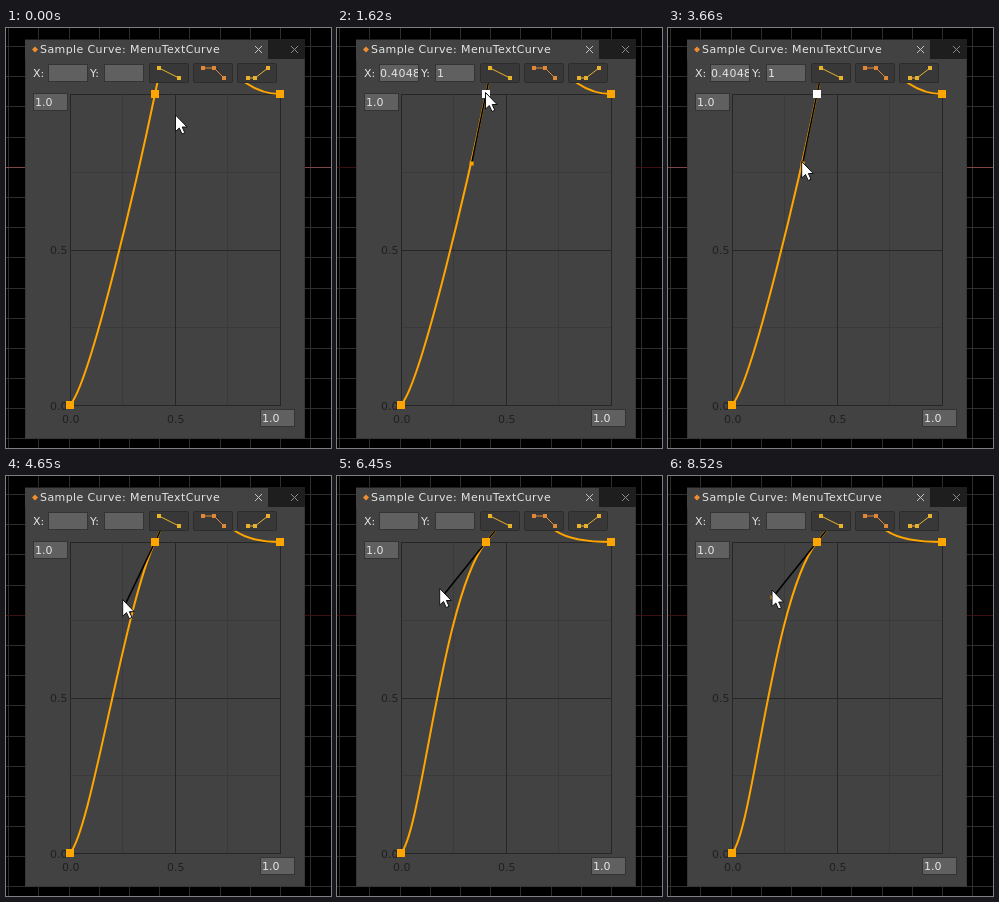
Write an HTML page that moves like this. It is 325 by 420 pixels and loops after 9120 ms.

```html
<!DOCTYPE html>
<html lang="en">
<head>
<meta charset="utf-8">
<title>Curve editor</title>
<style>
html, body { margin: 0; width: 100%; height: 100%; overflow: hidden; background: #000; }
svg { display: block; width: 325px; height: 420px; }
text { font: 11px "DejaVu Sans", sans-serif; fill: #e4e4e4; }
.title { letter-spacing: 0.4px; }
.label { fill: #202020; }
.crisp { shape-rendering: crispEdges; }
</style>
</head>
<body>
<svg viewBox="0 0 325 420" xmlns="http://www.w3.org/2000/svg">
  <defs>
    <clipPath id="view"><rect x="20" y="55" width="278" height="354"/></clipPath>
    <clipPath id="xBox"><rect x="43" y="37" width="38" height="17"/></clipPath>
  </defs>

  <g id="back" class="crisp"></g>
  <path id="axis" class="crisp" d="M0 139.5H325"/>

  <g class="crisp">
    <rect x="19" y="11" width="280" height="400" fill="#363636"/>
    <rect x="19" y="11" width="280" height="20" fill="#1e1e1e"/>
    <rect x="19" y="12" width="243" height="20" fill="#424242"/>
    <rect x="20" y="31" width="278" height="379" fill="#424242"/>
  </g>
  <path d="M29 18.5l3 3l-3 3l-3-3z" fill="#f08c32"/>
  <text class="title" x="34" y="25">Sample Curve: MenuTextCurve</text>
  <path d="M249 18l7 7m0-7l-7 7" stroke="#c4c4c4"/>
  <path d="M285 18l7 7m0-7l-7 7" stroke="#8a8a8a"/>

  <text x="27" y="49">X:</text>
  <text x="84" y="49">Y:</text>
  <g id="boxes" class="crisp"></g>
  <g id="values" visibility="hidden">
    <text x="43" y="49" letter-spacing="0.3" clip-path="url(#xBox)">0.4048</text>
    <text x="100" y="49">1</text>
  </g>
  <g id="presets"></g>

  <g class="crisp" fill="none">
    <path d="M116.5 66V377M221.5 66V377M64 144.5H274M64 299.5H274" stroke="#3a3a3a"/>
    <path d="M64.5 66.5H274.5V377.5H64.5ZM169.5 66V377M64 222.5H274" stroke="#262626"/>
  </g>
  <g id="labels"></g>
  <text x="29" y="78">1.0</text>
  <text x="256" y="394">1.0</text>

  <g clip-path="url(#view)" fill="none">
    <path id="curve" stroke="#ffa500" stroke-width="2" stroke-linejoin="round"/>
    <g id="handle">
      <path id="bar" stroke="#000" stroke-width="1.5"/>
      <rect id="grip" width="4" height="4" fill="#ffa500"/>
    </g>
  </g>
  <g id="keys" class="crisp"></g>
  <path id="cursor" d="M0 0V16.5L3.8 13L6.5 19L9.3 17.8L6.7 12H11.6Z" fill="#fff" stroke="#111"/>
</svg>
<script>
const LOOP = 9120, STEP = 30;
const SELECT = 1620, GRAB = 3750;
const START = [64, 377], MID = [149, 66], END = [274, 66];
const REACH = 71;
const $ = id => document.getElementById(id);

function set(el, attrs) {
  for (const name in attrs) el.setAttribute(name, attrs[name]);
}

function add(parent, tag, attrs, text) {
  const el = document.createElementNS("http://www.w3.org/2000/svg", tag);
  set(el, attrs);
  if (text) el.textContent = text;
  $(parent).append(el);
  return el;
}

// Scene grid behind the window
for (let i = 0; i < 14; i++) {
  const x = Math.floor(2.6 + i * 30.2) + 0.5;
  const y = Math.floor(18.4 + i * 30.2) + 0.5;
  add("back", "path", { d: `M${x} 0V420M0 ${y}H325`, stroke: "#2e2e2e" });
}

for (const [x, y] of [[42, 36], [98, 36], [27, 65], [254, 381]])
  add("boxes", "rect", {
    x: x + 0.5, y: y + 0.5, width: y === 36 ? 39 : 34, height: 17,
    fill: "#606060", stroke: "#343434"
  });

const presets = [
  ["#e8b428", [[153, 40], [173, 50]]],
  ["#e08838", [[197, 40], [208, 40], [218, 50]]],
  ["#e8b030", [[242, 50], [249, 50], [262, 40]]]
];
presets.forEach(([color, points], i) => {
  add("presets", "rect", {
    x: 143.5 + i * 44, y: 35.5, width: 39, height: 19, rx: 1, fill: "#383838", stroke: "#2c2c2c"
  });
  add("presets", "path", { d: "M" + points.join("L"), fill: "none", stroke: color });
  for (const [x, y] of points)
    add("presets", "rect", { x: x - 2, y: y - 2, width: 4, height: 4, fill: color });
});

["0.0", "0.5"].forEach((s, i) => {
  add("labels", "text", { x: 44, y: 382 - i * 156, class: "label" }, s);
  add("labels", "text", { x: 56 + i * 105, y: 395, class: "label" }, s);
});

const keys = [START, MID, END].map(([x, y]) =>
  add("keys", "rect", { x: x - 4, y: y - 4, width: 8, height: 8, fill: "#ffa500" }));

// Pointer trips: begin, finish, x, y, tilt of the handle in degrees
const HOME = [169.5, 87, 11.7];
const trips = [
  [450, 1140, 148.5, 64.5, 11.7],
  [2070, 2490, 133.7, 133.5, 11.7],
  [4080, 4860, 113, 121.5, 28.5],
  [5340, 6270, 102.7, 112.5, 38.7],
  [7680, 8520, 104, 114, 38.7]
];

const ease = k => k * k * (3 - 2 * k);

function pose(t) {
  let now = HOME;
  for (const [from, to, ...goal] of trips) {
    const k = ease(Math.min(1, Math.max(0, (t - from) / (to - from))));
    now = now.map((v, i) => v + (goal[i] - v) * k);
  }
  return now;
}

function draw(t) {
  const [x, y, tilt] = pose(t);
  const a = tilt * Math.PI / 180;
  const tip = [MID[0] - REACH * Math.sin(a), MID[1] + REACH * Math.cos(a)];
  const exit = [MID[0] + 14 * Math.tan(a), MID[1] - 14];
  const back = 240 - (tilt - HOME[2]) * 0.78;

  set($("curve"), {
    d: `M${START}C85 355 ${tip} ${MID}L${exit}M${back - 4} 52L${back} 55Q${back + 16} 66 ${END}`
  });
  set($("bar"), { d: `M${tip}L${exit}` });
  set($("grip"), { x: tip[0] - 2, y: tip[1] - 2 });
  set($("cursor"), { transform: `translate(${x} ${y})` });

  const selected = t >= SELECT && t < GRAB;
  set($("handle"), { visibility: t >= SELECT ? "visible" : "hidden" });
  set($("values"), { visibility: selected ? "visible" : "hidden" });
  set(keys[1], { fill: selected ? "#fff" : "#ffa500" });
  const bright = t < 450 || (t >= 3660 && t < GRAB);
  set($("axis"), { stroke: bright ? "#7c4444" : "#3c1010" });
}

const begin = performance.now();
function tick() {
  const t = Math.max(0, performance.now() - begin) % LOOP;
  draw(Math.floor(t / STEP) * STEP);
  requestAnimationFrame(tick);
}
tick();
</script>
</body>
</html>
```
